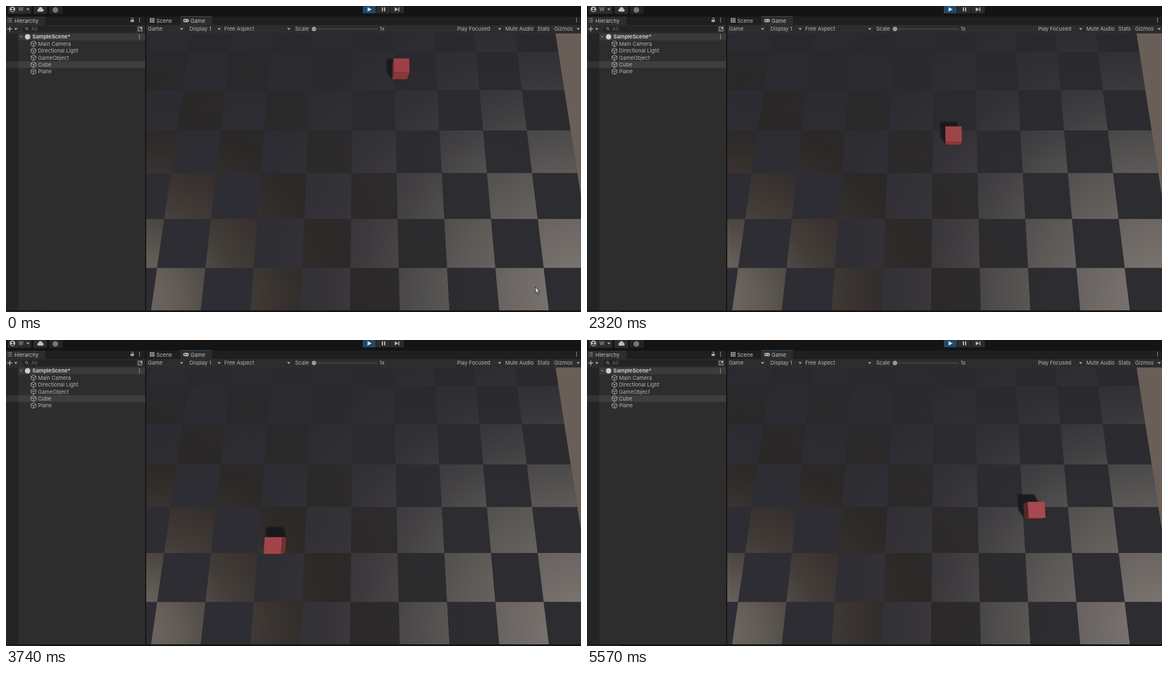
An HTML page with a canvas that plays this animation: 1025x546 px, repeating every 6360 ms.

```html
<!DOCTYPE html>
<html>
<head>
<meta charset="utf-8">
<style>
  html, body { margin: 0; width: 100%; height: 100%; overflow: hidden; background: #141414; }
  canvas { display: block; }
</style>
</head>
<body>
<canvas id="stage" width="1025" height="546"></canvas>
<script>
const W = 1025, H = 546, LOOP = 6360;
const stage = document.getElementById('stage').getContext('2d');
const still = document.createElement('canvas');
still.width = W; still.height = H;
let c = still.getContext('2d');

const rect = (color, x, y, w, h) => { c.fillStyle = color; c.fillRect(x, y, w, h); };
const rounded = (color, x, y, w, h, r = 2) => {
  c.fillStyle = color; c.beginPath(); c.roundRect(x, y, w, h, r); c.fill();
};
const disc = (color, x, y, r) => {
  c.fillStyle = color; c.beginPath(); c.arc(x, y, r, 0, 7); c.fill();
};
const trace = (points, path = c) => {
  points.forEach(([x, y], i) => i ? path.lineTo(x, y) : path.moveTo(x, y));
  path.closePath();
};
const poly = (color, points) => { c.fillStyle = color; c.beginPath(); trace(points); c.fill(); };
const line = (color, width, ...points) => {
  c.strokeStyle = color; c.lineWidth = width; c.beginPath();
  points.forEach(([x, y], i) => i ? c.lineTo(x, y) : c.moveTo(x, y));
  c.stroke();
};
const text = (s, x, y, color = '#b4b4b4', weight = 400) => {
  c.font = `${weight} 9.4px Inter, sans-serif`;
  c.textBaseline = 'middle';
  c.fillStyle = color;
  c.fillText(s, x, y + .5);
};
const arrow = (x, y, color = '#a8a8a8') => poly(color, [[x - 3, y - 1.5], [x + 3, y - 1.5], [x, y + 2]]);
const dots = (x, y) => [-3, 0, 3].forEach(d => disc('#aaa', x, y + d, .9));

// ---- checkered floor ----
const rows = [17, 82, 150, 222, 298, 380, 467.5, 562];
const gridX = (k, y) => 618.4 - .0105 * (y - 49) + k * (72.2 + .0333 * (y - 49));

function radial(x, y, radius, stops) {
  const g = c.createRadialGradient(x, y, 0, x, y, radius);
  stops.forEach(([d, rgb]) => g.addColorStop(d / radius, `rgb(${rgb})`));
  return g;
}

function drawFloor() {
  c.save();
  c.beginPath(); c.rect(250, 49, 775, 494); c.clip();
  rect('#695f58', 250, 49, 775, 494);
  const leftLit = radial(215, 520 / .85, 620, [[0, '118,109,102'], [95, '97,91,86'], [200, '67,61,57'],
    [260, '58,52,49'], [325, '47,44,42'], [375, '43,40,39'], [620, '45,44,48']]);
  const rightLit = radial(1030, 520, 620, [[0, '130,123,118'], [105, '113,107,104'], [230, '91,88,86'],
    [300, '78,76,76'], [345, '69,67,69'], [400, '60,58,61'], [460, '53,51,56'], [600, '46,45,51']]);
  c.filter = 'blur(.6px)';
  poly('#2e2d32', [[gridX(-7, 17), 17], [gridX(5, 17), 17], [gridX(5, 562), 562], [gridX(-7, 562), 562]]);
  for (let r = 0; r < 7; r++) for (let k = -6; k < 5; k++) {
    const y0 = rows[r], y1 = rows[r + 1], left = (r + k) % 2 === 0;
    const quad = [[gridX(k, y0), y0], [gridX(k + 1, y0), y0], [gridX(k + 1, y1), y1], [gridX(k, y1), y1]];
    c.beginPath(); trace(quad);
    c.save();
    if (left) { c.translate(0, 78); c.scale(1, .85); c.translate(0, -78 / .85 + 78 / .85 - 78 / .85); }
    c.fillStyle = left ? leftLit : rightLit;
    c.fill();
    c.restore();
  }
  c.filter = 'none';
  const shade = c.createLinearGradient(0, 49, 0, 280);
  shade.addColorStop(0, 'rgba(30,30,35,.22)');
  shade.addColorStop(1, 'rgba(30,30,35,0)');
  poly(shade, [[250, 49], [gridX(5, 49), 49], [gridX(5, 280), 280], [250, 280]]);
  c.restore();
}

// ---- editor panels ----
function cubeIcon(x, y) {
  const p = a => [x + 5 * Math.sin(a * Math.PI / 3), y - 5 * Math.cos(a * Math.PI / 3)];
  line('#b0b0b0', 1, p(0), p(1), p(2), p(3), p(4), p(5), p(0));
  [1, 3, 5].forEach(a => line('#b0b0b0', 1, [x, y], p(a)));
}

function drawPanels() {
  rect('#141414', 0, 0, W, 49);
  rounded('#2c2c2c', 3, -3, 42, 17); rounded('#2c2c2c', 49, -3, 24, 17); rounded('#242424', 77, -3, 24, 17);
  disc('#bdbdbd', 11.5, 6, 5); disc('#2c2c2c', 11.5, 4.5, 1.7); rounded('#2c2c2c', 8.5, 7.2, 6, 2.2, 1);
  text('W', 22, 6); arrow(39, 6);
  disc('#bdbdbd', 58.5, 7.5, 2.6); disc('#bdbdbd', 61.5, 5.5, 3.4); disc('#bdbdbd', 64.5, 7.5, 2.6);
  rect('#bdbdbd', 58.5, 7, 6, 3.1);
  disc('#777', 88, 7, 5);
  rect('#224867', 636, 0, 23, 13); rect('#2c2c2c', 660, 0, 24, 13); rect('#2c2c2c', 685, 0, 24, 13);
  poly('#d5dde4', [[644.5, 2], [652, 6], [644.5, 10]]);
  rect('#c0c0c0', 670, 2.5, 2, 7); rect('#c0c0c0', 674, 2.5, 2, 7);
  poly('#c0c0c0', [[693, 2.5], [699, 6], [693, 9.5]]); rect('#c0c0c0', 699.5, 2.5, 1.6, 7);

  rect('#1f1f1f', 0, 19, W, 15);
  rect('#2d2d2d', 0, 19, 70, 15); rect('#2d2d2d', 311, 18, 56, 16);
  rect('#27506f', 311, 18, 56, 1);
  rect('#2d2d2d', 0, 34, W, 15);
  rect('#2d2d2d', 0, 49, 248, 494); rect('#242424', 0, 49, 22, 494);
  rect('#3a3a3a', 22, 49, 226, 12.5);
  rect('#333', 0, 98.5, 22, 12); rect('#3e3e3e', 22, 98.5, 226, 12);
  rect('#141414', 248, 18, 2, 525); rect('#141414', 0, 543, W, 3); rect('#333', 0, 545, 58, 1);

  [23, 26, 29].forEach(y => { rect('#aaa', 3, y - 1, 1.5, 1); rect('#aaa', 5.5, y - 1, 5, 1); });
  text('Hierarchy', 15, 26.5, '#c0c0c0');
  rect('#aaa', 222, 24.5, 6, 4); line('#aaa', 1, [223.5, 22.5], [223.5, 21.5], [226.5, 21.5], [226.5, 25]);
  dots(238, 25); dots(238, 55); dots(1017, 25);

  rect('#b8b8b8', 2.5, 40.3, 8.5, 1.4); rect('#b8b8b8', 6, 36.8, 1.4, 8.5);
  arrow(17.5, 41);
  rounded('#232323', 30, 35.5, 202, 11, 3);
  c.strokeStyle = '#999'; c.lineWidth = 1; c.beginPath(); c.arc(36.5, 40, 2, 0, 7); c.stroke();
  line('#999', 1, [38, 41.5], [40, 43.5]);
  text('All', 45, 41, '#686868');
  c.strokeStyle = '#aaa'; c.strokeRect(235.5, 37.5, 7, 7);
  line('#aaa', 1, [237, 43], [240.5, 39.5]); disc('#aaa', 240.5, 39.5, 1.5);

  arrow(27, 55, '#6e6e6e');
  disc('#cfcfcf', 38.5, 55, 4.8);
  text('SampleScene*', 47, 55, '#c8c8c8', 700);
  ['Main Camera', 'Directional Light', 'GameObject', 'Cube', 'Plane'].forEach((s, i) => {
    const y = 67.4 + i * 12.4;
    cubeIcon(49, y); text(s, 57, y);
  });

  [257, 260, 263].forEach(v => {
    line('#b5b5b5', 1, [v + .5, 21.5], [v + .5, 30]);
    line('#b5b5b5', 1, [256, v - 234.5], [265, v - 234.5]);
  });
  text('Scene', 268, 26.5, '#c0c0c0');
  rounded('#b8b8b8', 316, 23, 10, 6, 3); disc('#2d2d2d', 319, 26, 1.2); disc('#2d2d2d', 323, 26, 1);
  text('Game', 329, 26.5, '#c0c0c0');
  [['Game', 253], ['Display 1', 327], ['Free Aspect', 389], ['Scale', 515.5], ['1x', 666],
   ['Play Focused', 804], ['Mute Audio', 890], ['Stats', 947], ['Gizmos', 977]].forEach(([s, x]) => text(s, x, 41));
  [313, 380, 504, 880, 1020].forEach(x => arrow(x, 41));
  rect('#5a5a5a', 549, 40.5, 113, 1); disc('#999', 549, 41, 4);
  [320, 386, 512, 885, 943, 971].forEach(x => rect('#232323', x, 35, 1, 13));
}

drawFloor();
drawPanels();

// ---- moving cube ----
// time, x, y of the cube's upper face
const route = [[1300, 705, 106], [1600, 707, 146], [1910, 709, 196], [2320, 653, 228.5], [2590, 601, 221],
  [2990, 511.5, 219.5], [3270, 452, 266], [3450, 440, 307], [3740, 475.5, 366.5], [3940, 520, 405],
  [4100, 558, 415], [4340, 615, 394], [4620, 679, 337], [4820, 715.5, 296], [5070, 765, 266],
  [5300, 798, 287], [5570, 801.5, 303]];

function slope(i, axis) {
  if (i === 0 || i === route.length - 1) return 0;
  const a = route[i - 1], b = route[i + 1];
  return (b[axis] - a[axis]) / (b[0] - a[0]);
}

function along(t) {
  t = Math.max(1300, Math.min(5570, t));
  let i = 0;
  while (i < route.length - 2 && t > route[i + 1][0]) i++;
  const a = route[i], b = route[i + 1], d = b[0] - a[0], u = (t - a[0]) / d, v = 1 - u;
  return [1, 2].map(n => a[n] * v * v * (1 + 2 * u) + b[n] * u * u * (3 - 2 * u)
    + d * u * v * (slope(i, n) * v - slope(i + 1, n) * u));
}

function drawCube([x, y]) {
  const w = 14 + (y - 106) * .0055, h = 12.5 + (y - 106) * .009, lean = (x - 637) * .0004 * h;
  const top = [[x - w - lean, y - h], [x + w - lean, y - h], [x + w + lean, y + h], [x - w + lean, y + h]];
  const base = top.map(([px, py]) => [px + (640 - px) * .053, py + (350 - py) * .053]);
  const cast = top.map(([px, py]) => [px - .065 * (x - 510), py - .073 * (y - 106)]);

  const shadow = new Path2D();
  for (let s = 0; s <= 1; s += .05)
    trace(base.map((p, i) => [p[0] + (cast[i][0] - p[0]) * s, p[1] + (cast[i][1] - p[1]) * s]), shadow);
  c.filter = 'blur(1.3px)';
  c.fillStyle = 'rgba(24,24,28,.92)';
  c.fill(shadow);
  c.filter = 'none';

  const side = (color, i, j) => poly(color, [top[i], top[j], base[j], base[i]]);
  if (x > 640) side('#54282a', 0, 3); else side('#733130', 1, 2);
  if (y < 340) side('#8a3637', 3, 2);
  const glow = (x - 480) * .03 + (y - 106) * .05;
  poly(`rgb(${148 + glow},${60 + glow * .7},${65 + glow * .7})`, top);
}

function drawPointer(x, y) {
  const shape = [[0, 0], [0, 11.5], [2.7, 9.2], [4.6, 13.8], [6.4, 13], [4.5, 8.6], [8, 8.2]];
  c.beginPath(); trace(shape.map(p => [x + p[0], y + p[1]]));
  c.fillStyle = '#c9c9c9'; c.fill();
  c.strokeStyle = '#1c1c1c'; c.lineWidth = .9; c.stroke();
}

c = stage;
function frame(now) {
  const t = now % LOOP, step = 67.8;
  c.drawImage(still, 0, 0);
  drawCube(along(1300 + Math.floor((t - 1300) / step + .2) * step));
  if (t < 490) {
    const p = Math.floor(t / 70) / 6;
    drawPointer(943.5 - 145 * p, 501 - 112 * p);
  }
  requestAnimationFrame(frame);
}
requestAnimationFrame(frame);
</script>
</body>
</html>
```
